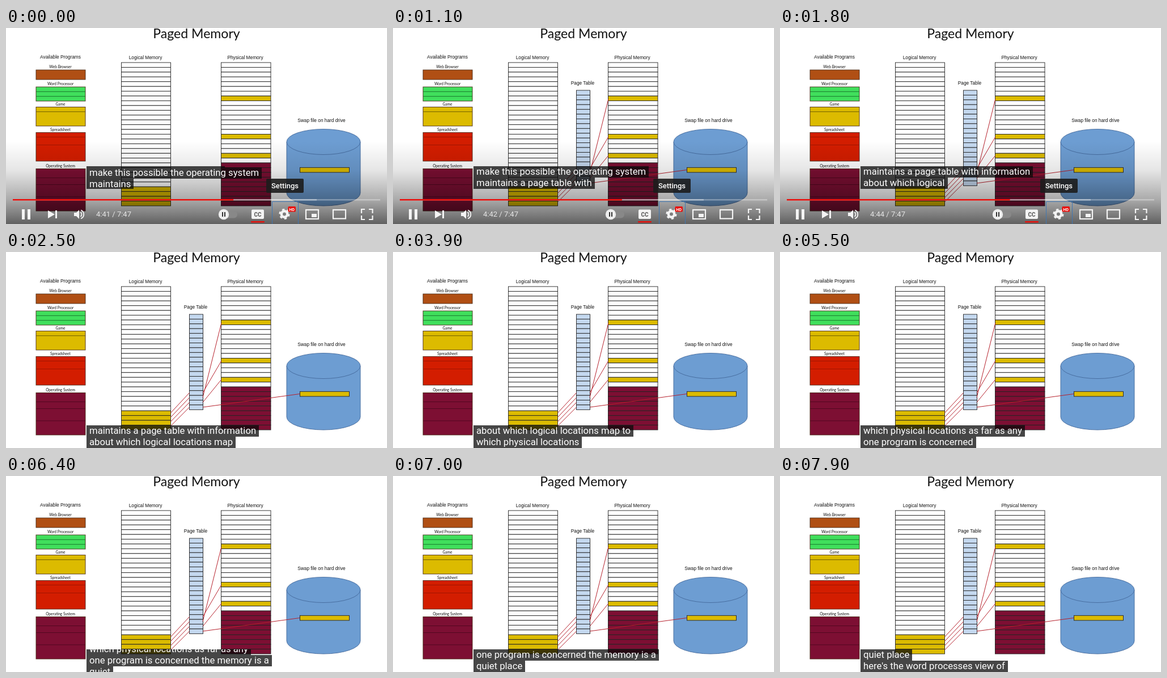
These frames come from a looping animation (672 px wide and 346 px high, 8000 ms). An HTML page:

```html
<!DOCTYPE html>
<html>
<head>
<meta charset="utf-8">
<style>
html, body { margin: 0; width: 100%; height: 100%; overflow: hidden; background: #fff; }
svg { position: absolute; left: 0; top: 0; }
.arial { font: 8.3px "Liberation Sans", Arial, sans-serif; text-anchor: middle; fill: #111; }
.small { font: 6.6px Lato, sans-serif; text-anchor: middle; fill: #111; }
.title { font: 23.1px Lato, sans-serif; text-anchor: middle; fill: #111; }
.ui { font: 13px Roboto, sans-serif; fill: #e6e6e6; }
#caption { position: absolute; left: 142px; width: 500px; height: 40px; overflow: hidden; }
#caption span {
  position: absolute; left: 0; height: 20px; padding: 0 5px; white-space: pre;
  font: 16.7px/20px Roboto, sans-serif; color: #fff; background: rgba(8, 8, 8, .75);
}
</style>
</head>
<body>
<svg width="672" height="346" viewBox="0 0 672 346">
  <defs>
    <linearGradient id="shade" x1="0" y1="0" x2="0" y2="1">
      <stop offset="0" stop-opacity="0"/>
      <stop offset=".35" stop-opacity=".1"/>
      <stop offset=".7" stop-opacity=".33"/>
      <stop offset="1" stop-opacity=".62"/>
    </linearGradient>
  </defs>
  <g id="slide"></g>
  <g id="pageTable"></g>
  <g id="controls">
    <rect y="200" width="672" height="146" fill="url(#shade)"/>
    <path d="M469.5 346V306.5H515.5V346" fill="none" stroke="#3f78b4"/>
    <rect x="12" y="302" width="648" height="2.6" fill="#fff" opacity=".3"/>
    <rect x="12" y="302" width="536" height="2.6" fill="#fff" opacity=".35"/>
    <rect id="played" x="12" y="302" height="2.6" fill="#e8100c"/>
    <g fill="#f4f4f4">
      <path d="M28 320h5v18h-5zM38 320h5v18h-5zM74 322l12 7-12 7zM87 322h3v14h-3z"/>
      <path d="M120 326h4l5-5v16l-5-5h-4z"/>
      <path d="M131.5 325a5 5 0 0 1 0 8M132 321.5a8 8 0 0 1 0 15" fill="none" stroke="#f4f4f4" stroke-width="1.8"/>
    </g>
    <text id="clock" class="ui" x="159" y="333"></text>
    <rect x="376" y="323" width="32" height="12.5" rx="6.2" fill="#888"/>
    <circle cx="384" cy="329" r="9.2" fill="#eee"/>
    <path d="M381 325h2v8h-2zM385 325h2v8h-2z" fill="#333"/>
    <rect x="433" y="320.5" width="22" height="16.5" rx="2" fill="#f4f4f4"/>
    <text x="444" y="332.5" text-anchor="middle" font-family="Roboto, sans-serif" font-size="10" font-weight="700" fill="#555">CC</text>
    <rect x="432" y="341" width="24" height="2.5" rx="1" fill="#e8100c"/>
    <circle cx="491" cy="328.5" r="5.2" fill="none" stroke="#f4f4f4" stroke-width="4.4"/>
    <circle cx="491" cy="328.5" r="8.3" fill="none" stroke="#f4f4f4" stroke-width="2.6" stroke-dasharray="4.35"/>
    <rect x="497.500" y="315" width="13.500" height="9.500" rx="1.500" fill="#e8100c"/>
    <text x="504.200" y="322.500" text-anchor="middle" font-family="Roboto, sans-serif" font-size="7" font-weight="700" fill="#fff">HD</text>
    <g fill="none" stroke="#f4f4f4" stroke-width="2.2">
      <rect x="529" y="321" width="22" height="16"/>
      <rect x="577" y="321" width="22" height="15.500"/>
      <path d="M627 327v-7h6M640 320h6.500v7M646.500 331v7H640M633 338h-6v-7"/>
    </g>
    <rect x="539" y="328" width="9" height="6" fill="#f4f4f4"/>
  </g>
</svg>
<div id="caption"><span></span><span></span><span></span></div>
<svg id="tip" width="672" height="346" viewBox="0 0 672 346">
  <rect x="459" y="266" width="66" height="25" rx="2" fill="#1c1c1c" opacity=".9"/>
  <text class="ui" x="492" y="283" text-anchor="middle" style="font-weight:500;fill:#fff">Settings</text>
</svg>
<script>
const $ = id => document.getElementById(id);
const GOLD = '#dcbb00', WINE = '#7d0f33', ROW = 253 / 30;

const rect = (x, y, w, h, fill, stroke = '#222') =>
  `<rect x="${x}" y="${y}" width="${w}" height="${h}" fill="${fill}" stroke="${stroke}" stroke-width=".9"/>`;
const line = (x1, y1, x2, y2, stroke, width = .9) =>
  `<path d="M${x1} ${y1}L${x2} ${y2}" stroke="${stroke}" stroke-width="${width}"/>`;
const label = (cls, x, y, text) => `<text class="${cls}" x="${x}" y="${y}">${text}</text>`;
const stack = (x, y, w, count, h, fillOf) =>
  Array.from({length: count}, (_, i) => rect(x, y + i * h, w, h, fillOf(i))).join('');

// name, label baseline, top, bottom, fill, divider colour, dividers
const programs = [
  ['Web Browser', 71, 74, 91, '#b04f14', '', []],
  ['Word Processor', 101, 104, 129, '#40df5c', '#176b28', [112.3, 120.7]],
  ['Game', 137, 139.5, 173, GOLD, '#5e5000', [147.8]],
  ['Spreadsheet', 181.5, 184.5, 235, '#d31d00', '#9c1400', [192.5, 206.5]],
  ['Operating System', 245.5, 248.5, 323, WINE, '#4d061d', [264.5, 276.5, 298]]
];

$('slide').innerHTML =
  label('title', 336, 18, 'Paged Memory') +
  label('arial', 96, 54, 'Available Programs') +
  label('arial', 246, 54.5, 'Logical Memory') +
  label('arial', 422, 54.5, 'Physical Memory') +
  label('arial', 556.5, 166, 'Swap file on hard drive') +
  programs.map(([name, base, top, bottom, fill, ink, cuts]) =>
    label('small', 96, base, name) + rect(53, top, 87, bottom - top, fill, '#4a2a18') +
    cuts.map(y => line(53, y, 140, y, ink)).join('')).join('') +
  stack(203.5, 61, 87, 30, ROW, i => i > 25 ? GOLD : '#fff') +
  stack(379.5, 61, 87.5, 30, ROW, i => i > 20 ? WINE : [7, 15, 19].includes(i) ? GOLD : '#fff') +
  `<g fill="#6d9dd2" stroke="#44699b" stroke-width=".9">
    <path d="M495 201V291a65 23 0 0 0 130 0V201"/>
    <ellipse cx="560" cy="201" rx="65" ry="22.500"/></g>` +
  rect(518.5, 246.3, 87, 8.6, GOLD);

const entryY = i => 248.5 + i * 8.5;
const links = [[380, 192], [380, 125], [380, 225], [518, 250.5]];
$('pageTable').innerHTML =
  label('arial', 334.5, 100, 'Page Table') +
  stack(323.5, 110, 24, 20, 8.42, () => '#c4d8ef') +
  links.map(([x, y], i) =>
    line(290.5, 284 + i * 7.7, 323.5, entryY(i), '#b5202c', 1) +
    line(347, entryY(i), x, y, '#b5202c', 1)).join('');

// Each caption line: its words and the time each is spoken
const captions = [
  ['to any page in physical memory', [-900]],
  ['make this possible the operating system', [-800]],
  ['maintains a page table with information', [-180, 300, 500, 700, 950, 1150]],
  ['about which logical locations map to', [1400, 1600, 1750, 2150, 2450, 2650]],
  ['which physical locations as far as any', [2900, 3200, 3550, 4050, 4200, 4350, 4500]],
  ['one program is concerned the memory is a', [4700, 4900, 5150, 5300, 5650, 5850, 6050, 6150]],
  ['quiet place', [6300, 6700]],
  ["here's the word processes view of", [7000, 7200, 7300, 7500, 7700, 7800]]
].map(([text, times]) => ({words: text.split(' '), times}));

const clamp = v => Math.max(0, Math.min(1, v));
const rows = [...$('caption').children];

function drawCaption(t, lift) {
  $('caption').style.top = 306 - 62 * lift + 'px';
  const last = captions.findLastIndex(c => c.times[0] <= t);
  const roll = 1 - clamp((t - captions[last].times[0]) / 200);
  rows.forEach((row, n) => {
    const {words, times} = captions[last - 2 + n] || captions[0];
    const text = words.filter((_, i) => (times[i] ?? times[0]) <= t).join(' ');
    if (row.textContent !== text) row.textContent = text;
    row.style.top = (n - 1 + roll) * 20 + 'px';
  });
}

function draw(t) {
  const shown = 1 - clamp((t - 2150) / 150);
  const seconds = 281 + t * .0018;
  $('pageTable').style.display = t < 600 ? 'none' : '';
  $('controls').style.opacity = $('tip').style.opacity = shown;
  $('played').setAttribute('width', seconds / 467 * 648 - .8);
  $('clock').textContent = `4:${Math.floor(seconds) - 240} / 7:47`;
  drawCaption(t, shown);
}

const start = performance.now();
function tick() {
  draw((performance.now() - start) % 8000);
  requestAnimationFrame(tick);
}
tick();
</script>
</body>
</html>
```
